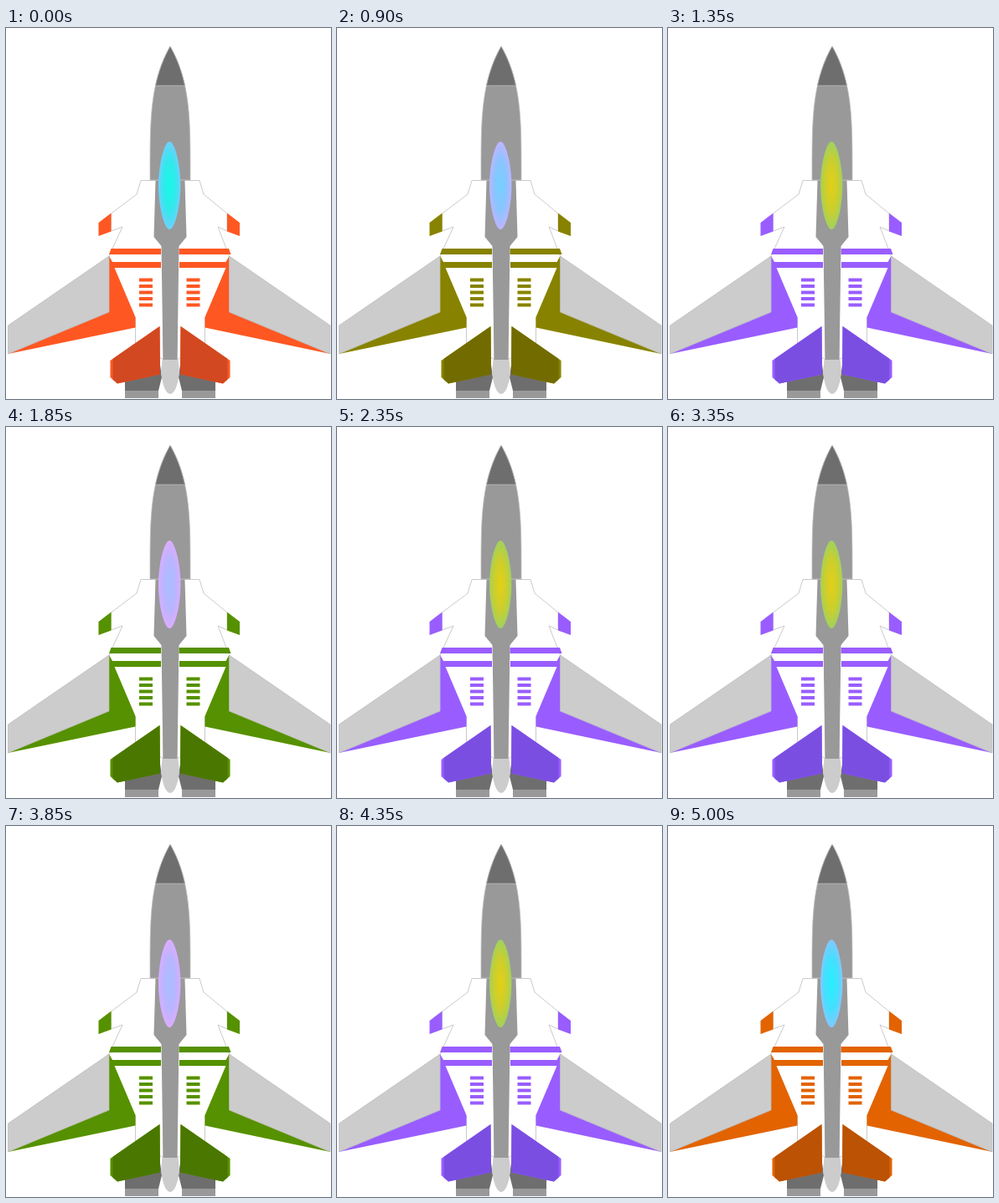
Recreate the animation shown at these times as an HTML page with a canvas. Size 388 by 444 pixels, loop 5050 ms.

```html
<!DOCTYPE html>
<html lang="en">
<head>
<meta charset="utf-8">
<title>Jet</title>
<style>
html, body { margin: 0; width: 100%; height: 100%; overflow: hidden; background: #fff; }
canvas { display: block; width: 388px; height: 444px; }
</style>
</head>
<body>
<canvas id="jet" width="388" height="444"></canvas>
<script>
const canvas = document.getElementById('jet');
const ctx = canvas.getContext('2d');

const ORANGE = '#ff5722', RUST = '#d24820', WHITE = '#fff';
const DARK = '#6e6e6e', GREY = '#999', LIGHT = '#ccc', LINE = '#bdbdbd';
const MID = 196, NOSE = 22, SHOULDER = 182.5;
const STEP = 50, STEPS = 101, TURN = 20, DELAY = 0.9;

// Key points of the left side
const root = [123, 273], wingTip = [2.5, 390], knee = [123, 340];
const hip = [154.5, 346], hem = [154.5, 358.5], notch = [139, 238];

function paint(path, fill, line) {
  ctx.fillStyle = fill;
  ctx.fill(path);
  if (line) {
    ctx.strokeStyle = line;
    ctx.lineWidth = 0.8;
    ctx.stroke(path);
  }
}

function poly(points, fill, line) {
  const path = new Path2D();
  points.forEach(([x, y]) => path.lineTo(x, y));
  path.closePath();
  paint(path, fill, line);
}

const even = x => 2 * MID - x;
// The outer parts reach a little less far on the right.
const outer = x => (x > 129 ? 392 : 389.5) - x;

function pair(points, fill, line, mirror = even) {
  poly(points, fill, line);
  poly(points.map(([x, y]) => [mirror(x), y]), fill, line);
}

function box(x, y, w, h) {
  return [[x, y], [x + w, y], [x + w, y + h], [x, y + h]];
}

// Rounded nose profile, cut off at the given height
function ogive(end) {
  const side = [];
  for (let y = NOSE; y <= end; y++) {
    const u = (y - NOSE) / (SHOULDER - NOSE);
    side.push([MID - 24 * (1 - (1 - u) ** 3.8), y]);
  }
  return [...side, ...side.map(([x, y]) => [even(x), y]).reverse()];
}

function drawFuselage() {
  poly(ogive(SHOULDER), GREY, LINE);
  poly(ogive(69), DARK, LINE);
}

function drawWings() {
  pair([[161, SHOULDER], [186, SHOULDER], [188, 397], [154.5, 377], hip, root,
    notch, [125.5, 243], [125.5, 222], [156, 199]], WHITE, LINE, outer);
  pair([[125.5, 221.5], [110.5, 233], [110.5, 249], [125.5, 243.5]], ORANGE, null, outer);
  pair([root, wingTip, hem, hip, [185, 287], [185, 280], [127, 280]], ORANGE, null, outer);
  pair([root, [2.5, 356], wingTip, knee], LIGHT, LINE, outer);
  pair([[129.5, 287], [187, 287], [187, 346], hip], WHITE);
  pair([[125.5, 264], [185, 264], [185, 271], [123, 271]], ORANGE, null, x => 391.5 - x);
  for (let i = 0; i < 5; i++) {
    pair(box(159, 299.5 + i * 7.5, 16, 4), ORANGE, null, x => 390.5 - x);
  }
}

function drawSpine() {
  pair([[178.5, SHOULDER], [MID + 1, SHOULDER], [MID + 1, 398], [187.5, 398],
    [185.5, 261], [176.5, 250]], GREY);
}

function drawTail() {
  pair([[142, 418], [184, 403], [186, 418], [182, 434], [142, 434]], DARK);
  pair(box(142, 434, 40, 9), GREY);
  const fin = [[183.5, 357], [124.5, 398], [124.5, 418], [133, 425.5], [184, 414.5]];
  pair(fin, ORANGE);
  ctx.save();
  ctx.beginPath();
  ctx.rect(127.5, 350, even(127.5) - 127.5, 80);
  ctx.clip();
  pair(fin, RUST);
  ctx.restore();
  paint(new Path2D('M186.5 397H205.5L207 412Q204 437 196 438Q188 437 185 412Z'), LIGHT);
}

function drawCanopy() {
  const glow = ctx.createRadialGradient(0, 0, 0, 0, 0, 1);
  glow.addColorStop(0, '#16f8e6');
  glow.addColorStop(0.6, '#34e8ec');
  glow.addColorStop(1, '#70d0fc');
  ctx.save();
  ctx.translate(195.2, 188.5);
  ctx.scale(13.2, 52.5);
  paint(new Path2D('M0 -1C.5 -1 1 -.45 1 0S.5 1 0 1S-1 .45 -1 0S-.5 -1 0 -1Z'), glow);
  ctx.restore();
}

ctx.fillStyle = WHITE;
ctx.fillRect(0, 0, canvas.width, canvas.height);
drawFuselage();
drawWings();
drawSpine();
drawTail();
drawCanopy();

// After a short delay the hue runs backwards, one turn per TURN steps.
function hueAt(step) {
  return -360 * Math.max(0, step - DELAY) / TURN;
}

let start;
function tick(now) {
  start ??= now;
  const step = Math.floor((now - start) / STEP) % STEPS;
  canvas.style.filter = `hue-rotate(${hueAt(step)}deg)`;
  requestAnimationFrame(tick);
}
requestAnimationFrame(tick);
</script>
</body>
</html>
```
